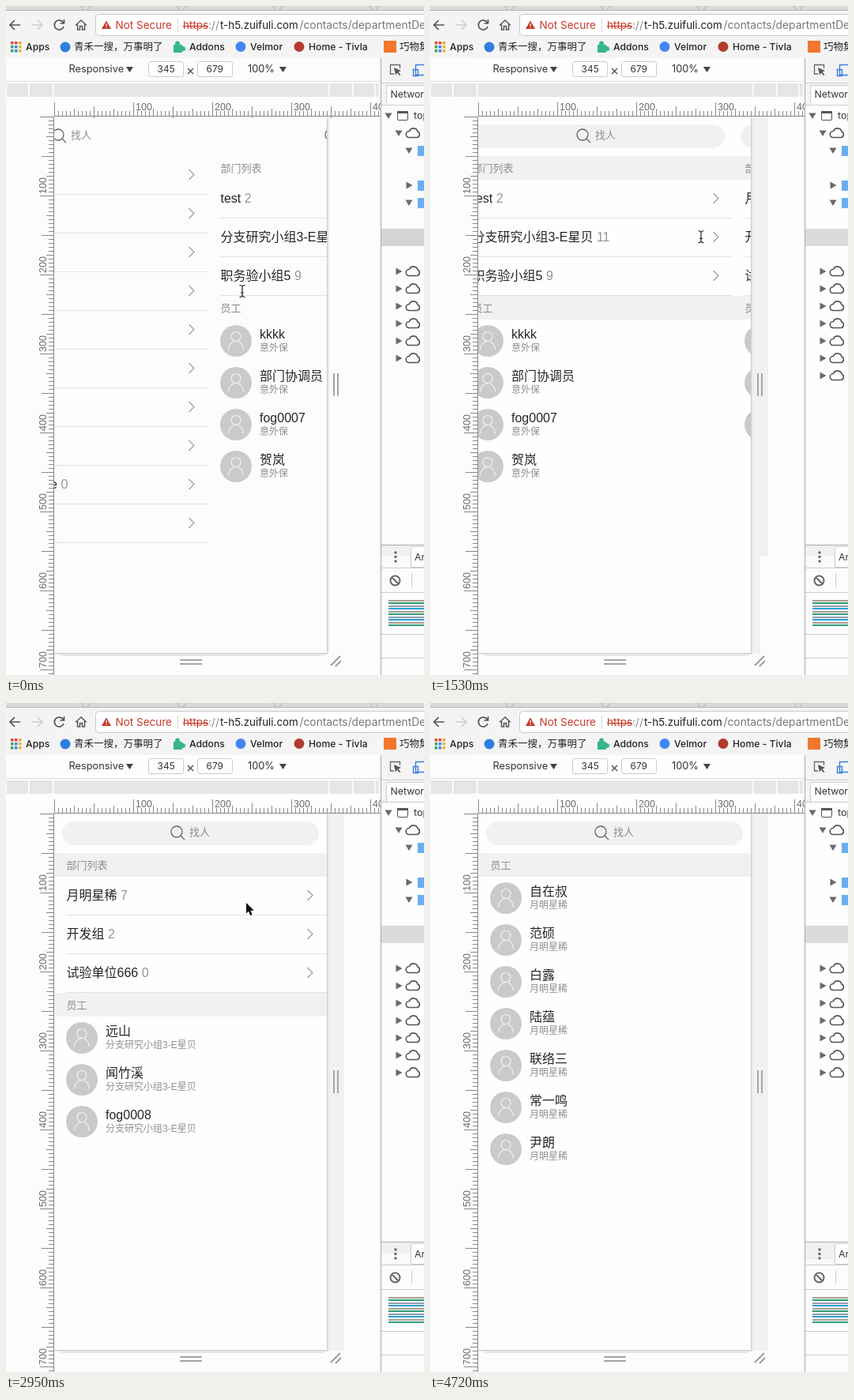
Write an HTML page with a canvas that moves like this. It is 529 px wide and 847 px high and loops after 4820 ms.

```html
<!DOCTYPE html>
<html lang="zh-CN">
<head>
<meta charset="utf-8">
<title>Page slides in a device preview</title>
<style>
html, body { margin: 0; width: 100%; height: 100%; overflow: hidden; background: #fcfcfc; }
canvas { display: block; }
</style>
</head>
<body>
<canvas id="stage" width="529" height="847"></canvas>
<script>
const c = document.getElementById('stage').getContext('2d');
const LOOP = 4820, STEP = 118, SLIDE = 1440, WIDTH = 345;
const CJK = '"Noto Sans CJK SC","Noto Sans CJK",sans-serif';
const PAGE_FONT = '"Liberation Sans",' + CJK, UI_FONT = 'Inter,' + CJK;

function rect(x, y, w, h, color) { c.fillStyle = color; c.fillRect(x, y, w, h); }
function text(s, x, y, size, color, font = PAGE_FONT, weight = 400) {
  c.font = `${weight} ${size}px ${font}`;
  c.fillStyle = color;
  c.fillText(s, x, y);
  return c.measureText(s).width;
}
function ui(s, x, y, size, color = '#333', weight = 400) { return text(s, x, y, size, color, UI_FONT, weight); }
function disc(x, y, r, color) { c.fillStyle = color; c.beginPath(); c.arc(x, y, r, 0, 7); c.fill(); }
function round(x, y, w, h, r, fill, line) {
  c.beginPath(); c.roundRect(x, y, w, h, r);
  if (fill) { c.fillStyle = fill; c.fill(); }
  if (line) { c.strokeStyle = line; c.lineWidth = 1; c.stroke(); }
}
function stroke(d, color, width = 1, x = 0, y = 0) {
  c.save(); c.translate(x, y);
  c.strokeStyle = color; c.lineWidth = width; c.stroke(new Path2D(d));
  c.restore();
}
function fill(d, color, x = 0, y = 0) {
  c.save(); c.translate(x, y);
  c.fillStyle = color; c.fill(new Path2D(d));
  c.restore();
}

// CSS "ease" curve
function ease(p) {
  if (p <= 0) return 0;
  if (p >= 1) return 1;
  const bez = (s, a, b) => 3 * (1 - s) ** 2 * s * a + 3 * (1 - s) * s * s * b + s ** 3;
  let lo = 0, hi = 1;
  for (let i = 0; i < 24; i++) {
    const mid = (lo + hi) / 2;
    if (bez(mid, .25, .25) < p) lo = mid; else hi = mid;
  }
  return bez(lo, .1, 1);
}

const GROUP = '分支研究小组3-E星贝', TEAM = '月明星稀', COVER = '意外保';
const pages = [
  { list: true },
  { rows: [['test', 2], [GROUP, 11], ['职务验小组5', 9]],
    people: ['kkkk', '部门协调员', 'fog0007', '贺岚'], sub: COVER },
  { rows: [[TEAM, 7], ['开发组', 2], ['试验单位666', 0]],
    people: ['远山', '闻竹溪', 'fog0008'], sub: GROUP },
  { people: ['自在叔', '范硕', '白露', '陆蕴', '联络三', '常一鸣', '尹朗'], sub: TEAM }
];
const starts = [-377, 1417, 3223];

function chevron(y) { stroke('M-3.5 -6.5L3 0L-3.5 6.5', '#999', 1.1, 385, y); }
function heading(s, y, tint) {
  rect(61, y, WIDTH, 30, tint);
  text(s, 76.5, y + 16.5, 13, '#8c8c8c', PAGE_FONT, 500);
}
function person(name, sub, y) {
  disc(96, y, 20, '#cacaca');
  stroke('M6 -5.5A6 6 0 1 1 -6 -5.5A6 6 0 1 1 6 -5.5M-9.5 11.5C-9 4 -5 1 0 .5M3 1C7 2.5 9 6 9.5 11.5', '#f2f2f2', 1.2, 96, y);
  text(name, 126, y - 7, 16, '#262626');
  text(sub, 126, y + 10, 12, '#8f8f8f', PAGE_FONT, 500);
}
function drawPage(page, off, tint) {
  c.save();
  c.translate(off, 0);
  c.beginPath(); c.rect(61, 140, WIDTH, 679); c.clip();
  round(71, 150, 325, 30, 15, tint);
  stroke('M7 0A7 7 0 1 1 -7 0A7 7 0 1 1 7 0M5 5L10 10', '#666', 1.3, 216, 163);
  text('找人', 232, 164.5, 13, '#8c8c8c', PAGE_FONT, 500);
  if (page.list) {
    for (let i = 0; i < 10; i++) {
      rect(61, 238 + 49 * i, WIDTH, 1, '#e2e2e2');
      chevron(213.5 + 49 * i);
    }
    text('e', 206, 607, 16, '#262626');
    text('0', 219.5, 607, 16, '#959595');
  }
  if (page.rows) {
    heading('部门列表', 190, tint);
    page.rows.forEach(([name, count], i) => {
      const y = 244 + 49 * i, w = text(name, 76.5, y + 1, 16, '#262626');
      text(count, 81 + w, y + 1, 16, '#959595');
      rect(76, y + 24, 330, 1, '#e2e2e2');
      chevron(y - .5);
    });
  }
  if (page.people) {
    const top = page.rows ? 367 : 190;
    heading('员工', top, tint);
    page.people.forEach((name, i) => person(name, page.sub, top + 57 + 53 * i));
  }
  c.restore();
}

function browserBar() {
  rect(0, 0, 529, 66, '#f4f4f4');
  rect(0, 0, 529, 5, '#d9d9d9');
  rect(0, 5, 529, 1, '#b5b5b5');
  for (const x of [95, 216, 338, 460]) stroke('M0 0L4 5M12 0L8 5', '#aaa', 1, x, 0);
  stroke('M18 24H5M11 18L5 24L11 30', '#555', 1.7);
  stroke('M33 24H46M40 18L46 24L40 30', '#cfcfcf', 1.7);
  stroke('M72.5 21A6 6 0 1 0 73 26M73.5 17V22H68.5', '#555', 1.7);
  stroke('M88 24.5L95 18L102 24.5M90.5 23V30H93.5V25.5H96.5V30H99.5V23', '#555', 1.5);
  round(113.5, 10.5, 430, 27, 4, '#fff', '#c9c9c9');
  fill('M127 18.5L133 29H121Z', '#c5392a');
  rect(126.5, 22, 1.2, 3.5, '#fff'); rect(126.5, 26.5, 1.2, 1.2, '#fff');
  ui('Not Secure', 138.5, 25, 13.5, '#c5392a');
  rect(217, 16, 1, 17, '#d5d5d5');
  const w = ui('https', 224, 25, 13.5, '#c5392a');
  rect(224, 25, w, 1.2, '#c5392a');
  ui('://', 224 + w, 25, 13.5, '#888');
  ui('t-h5.zuifuli.com', 271, 25, 13.4, '#222');
  ui('/contacts/departmentDe', 371.5, 25, 13.8, '#777');

  ['#e2483d', '#e2483d', '#f0a03a', '#3ba55c', '#4285f4', '#f0b429', '#3ba55c', '#4285f4', '#f0b429']
    .forEach((color, i) => rect(6 + i % 3 * 5, 45 + Math.floor(i / 3) * 5, 3.5, 3.5, color));
  disc(75, 52, 6.5, '#2f7de1');
  rect(212, 49, 11, 10, '#35b58a'); disc(217, 47.5, 3, '#35b58a'); disc(224, 54, 3, '#35b58a');
  disc(297, 51.5, 6.5, '#4285f4');
  disc(371, 51.5, 6.5, '#b33a2c');
  rect(478, 44, 16, 15, '#f2772d');
  for (const [s, x] of [['Apps', 25], ['Addons', 232], ['Velmor', 309], ['Home - Tivla', 383]])
    ui(s, x, 52, 12.2, '#222', 500);
  ui('青禾一搜，万事明了', 86, 52, 12.5, '#222', 500);
  ui('巧物集', 498, 52, 12.5, '#222', 500);
}

function deviceBar() {
  ui('Responsive', 79.5, 80.5, 12.8);
  ui('100%', 306, 80.5, 12.8);
  fill('M152 77H161L156.500 84Z', '#444');
  fill('M346 77H355L350.500 84Z', '#444');
  round(180.5, 70.5, 44, 19, 2, '#fff', '#ccc');
  round(242.5, 70.5, 44, 19, 2, '#fff', '#ccc');
  ui('345', 191.5, 80.5, 12);
  ui('679', 253.5, 80.5, 12);
  stroke('M230 79L237 86M237 79L230 86', '#444', 1.2);
  rect(0, 95, 474, 1, '#ddd');
  rect(1, 98, 471, 17, '#e6e6e6');
  for (const x of [28, 59, 408, 438, 466]) rect(x, 98, 1.5, 17, '#fff');
}

function rulers() {
  const grey = '#888';
  c.save();
  c.beginPath(); c.rect(0, 116, 474, 731); c.clip();
  rect(61, 139, 413, 1, grey);
  rect(60, 140, 1, 707, grey);
  for (let p = 0; p < 710; p += 5) {
    const len = p % 100 == 0 ? 17 : p % 50 == 0 ? 15 : p % 25 == 0 ? 9 : 6;
    rect(61 + p, 139 - (p % 100 ? Math.min(len, 12) : len), 1, len, grey);
    rect(60 - len, 140 + p, len, 1, grey);
    if (p && p % 100 == 0) {
      text(p, 64 + p, 128.5, 12.5, '#6c6c6c');
      c.save();
      c.translate(48, 138 + p); c.rotate(-Math.PI / 2);
      text(p, 0, 0, 12.5, '#6c6c6c');
      c.restore();
    }
  }
  c.restore();
}

function frameHandles() {
  rect(406, 140, 1, 680, '#ccc');
  rect(61, 819, 346, 1, '#ccc');
  rect(407, 143, 2, 676, '#e9e9e9');
  fill('M62 820H410L400 823H72Z', '#e6e6e6');
  for (const d of [0, 5]) {
    rect(414 + d, 465, 2, 29, '#a5a5a5');
    rect(220, 827 + d, 28, 2, '#a5a5a5');
  }
  stroke('M411 835L423 823M417 836L424 829', '#999', 1.8);
}

function cloud(x, y) {
  stroke('M-5 5.500H5.500A4 4 0 0 0 6 -2A5.500 5.500 0 0 0 -4.500 -2.500A4 4 0 0 0 -5 5.500Z', '#555', 1.6, x, y);
}
function twist(x, y, open) {
  fill(open ? 'M-4.500 -3.500H4.500L0 4Z' : 'M-3.500 -4.500V4.500L4.500 0Z', '#6a6a6a', x, y);
}
function devtools(k) {
  rect(475, 66, 54, 31, '#f4f4f4');
  rect(475, 97, 54, 28, '#f4f4f4');
  stroke('M491 86H486.500V74.500H498.500V79', '#666', 1.3);
  fill('M491 78L500 82L496.500 83.500L499.500 87L498 88L495 84.500L493 87.500Z', '#555');
  stroke('M529 74.500H518.500V87.500H529M515.500 80.500H521.500V88.500H515.500Z', '#3b7de0', 1.4);
  rect(475, 97, 54, 1, '#ccc');
  round(481.5, 100.5, 60, 25, 0, '#fff', '#ccc');
  ui('Network', 486.5, 112.5, 12.3);
  rect(475, 125, 54, 1, '#ccc');
  twist(484, 139, true);
  round(495.5, 133.5, 13, 11, 1.5, '#fff', '#555'); rect(495, 133, 14, 3, '#555');
  ui('top', 516, 139, 12.5);
  twist(497, 161, true); cloud(515, 161);
  for (const [y, open] of [[183, true], [227, false], [249, true]]) {
    twist(510, y, open);
    rect(521, y - 6, 8, 13, '#6aaef2');
  }
  rect(475, 282, 54, 22, k ? '#dbdbdb' : '#d4d4d4');
  const clouds = k ? 7 : 6;
  for (let i = 0; i < clouds; i++) { twist(497, 336 + 22 * i, false); cloud(515, 336 + 22 * i); }

  rect(475, 683, 54, 28, '#fafafa');
  rect(475, 683, 37, k < 28 ? 14 : 21, '#f0f0f0');
  rect(475, 682, 54, 1, '#aaa');
  for (const y of [692, 697.5, 703]) disc(493, y, 1.7, '#666');
  round(512.5, 684.5, 40, 26, 0, '#fff', '#ccc');
  ui('Ar', 517, 698.5, 12.3);
  for (const y of [711, 742, 795, 825]) rect(475, y, 54, 1, '#ccc');
  stroke('M6 0A6 6 0 1 1 -6 0A6 6 0 1 1 6 0M-4.200 -4.200L4.200 4.200', '#666', 2, 492.5, 727.5);
  rect(513, 718, 1, 18, '#ccc');
  const tones = ['#ab9f92', '#2f9e78', '#8f9cae', '#2b9fd0'];
  for (let i = 0; i < 10; i++) rect(484, 752 + Math.round(3.45 * i), 45, 2, tones[i % 4]);
  rect(474, 66, 1, 781, '#a8a8a8');
}

// step, x, y
const trail = [[0, 299, 361], [9, 321, 290], [12, 321, 290], [16, 409, 299], [21, 304, 253], [28, 304, 253]];
function cursor(k) {
  if (k > 28) return;
  const i = Math.max(1, trail.findIndex(p => p[0] >= k));
  const [k0, x0, y0] = trail[i - 1], [k1, x1, y1] = trail[i];
  const p = (k - k0) / (k1 - k0), x = x0 + (x1 - x0) * p, y = y0 + (y1 - y0) * p;
  if (x > 400) {
    const arrows = 'M-7.500 0L-3 -4.500V-1.200H3V-4.500L7.500 0L3 4.500V1.200H-3V4.500Z';
    stroke(arrows, '#fff', 2, x, y); fill(arrows, '#111', x, y);
  } else if (k < 16) {
    stroke('M-3.500 -7.500Q0 -7.500 0 -5V5Q0 7.500 -3.500 7.500M3.500 -7.500Q0 -7.500 0 -5V5Q0 7.500 3.500 7.500M-2 2H2', '#222', 1.2, x, y);
  } else {
    const arrow = 'M0 0V13.500L3 10.700L5.200 16L7.700 15L5.500 9.800H9.800Z';
    stroke(arrow, '#fff', 2, x, y); fill(arrow, '#111', x, y);
  }
}

function draw(k) {
  const time = k * STEP, tint = k ? '#f0f2f1' : '#fcfcfc';
  c.textBaseline = 'middle';
  rect(0, 0, 529, 847, '#fcfcfc');
  if (k) rect(61, 66, 468, 631, '#fefefe');
  browserBar();
  deviceBar();
  rulers();
  // the backdrop beside the page repaints in parts
  if (k) rect(407, 140, 21, 557, '#f0f1f1');
  if (k > 12) rect(407, 697, k < 17 ? 11 : 21, 123, '#f0f1f1');

  c.save();
  c.beginPath(); c.rect(61, 140, WIDTH, 679); c.clip();
  if (k > 12) rect(61, 140, WIDTH, 679, '#fefefe');
  const i = starts.filter(s => s <= time).length - 1;
  const off = Math.round(WIDTH * (1 - ease((time - starts[i]) / SLIDE)));
  if (off > 0) drawPage(pages[i], off - WIDTH, tint);
  drawPage(pages[i + 1], off, tint);
  c.restore();

  frameHandles();
  devtools(k);
  cursor(k);
}

// The picture advances in even steps of about 118 ms.
const begin = performance.now();
function tick() {
  const t = (performance.now() - begin) % LOOP;
  draw(Math.min(40, Math.floor((t + 10) / STEP)));
  requestAnimationFrame(tick);
}
tick();
</script>
</body>
</html>
```
